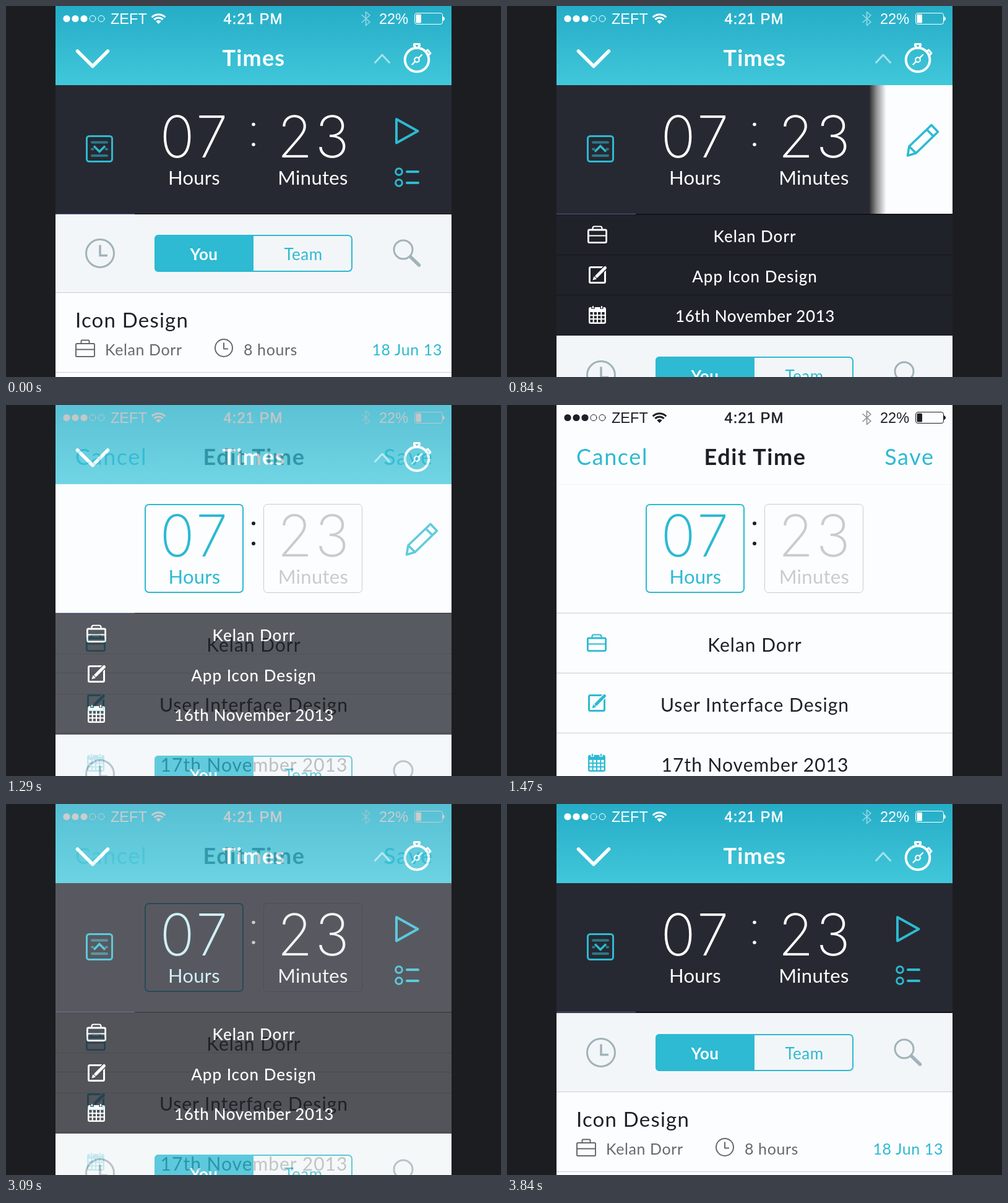
Recreate the animation shown at these times as an HTML page. Size 800x600 px, loop 4.5 s.

```html
<!DOCTYPE html>
<html lang="en">
<head>
<meta charset="utf-8">
<title>Time tracker</title>
<style>
  html, body { margin: 0; width: 100%; height: 100%; overflow: hidden; background: #1c1d21; }
  svg { display: block; }
  text { font-family: Lato, sans-serif; fill: currentColor; }
  .mid { text-anchor: middle; }
  .end { text-anchor: end; }
  .status text { font: 23.5px "Liberation Sans", Arial, sans-serif; }
  .status .clock { letter-spacing: 1.2px; stroke: currentColor; stroke-width: .6px; }
  .title { font-size: 36px; font-weight: 700; letter-spacing: 1.2px; }
  .action { font-size: 36px; letter-spacing: 1.6px; }
  .digits { font: 200 93px Inter, sans-serif; letter-spacing: 4px; }
  .unit { font-size: 31px; letter-spacing: .3px; }
  .row { font-size: 26px; font-weight: 500; letter-spacing: 1px; }
  .big { font-size: 30px; letter-spacing: 1px; }
  .tab { font-size: 26px; letter-spacing: .5px; }
  .name { font-size: 33px; letter-spacing: 1.2px; }
  .meta { font-size: 25px; letter-spacing: .6px; }
  .line { fill: none; stroke: currentColor; stroke-linecap: round; stroke-linejoin: round; }
  .gap { fill: none; stroke: var(--bg); }

  .list, .icon, .flip, .wipe, .edit, .cancel { animation: 4500ms linear infinite both; }
  .list { animation-name: list; }
  .icon { animation-name: press; transform-origin: 151px 231px; }
  .flip { animation-name: flip; animation-timing-function: step-end; transform-origin: 151px 231px; }
  .wipe { animation-name: wipe; }
  .edit { animation-name: edit; }
  .cancel { animation-name: cancel; animation-timing-function: step-end; }

  @keyframes list {
    0%, 3% { transform: translateY(0); animation-timing-function: ease-in-out; }
    9.3% { transform: translateY(197px); }
    78.667% { transform: translateY(197px); animation-timing-function: ease-in-out; }
    85.3%, 100% { transform: translateY(2px); }
  }
  @keyframes press {
    0%, 2.667% { transform: scale(1); }
    4.667% { transform: scale(.88); }
    8%, 78% { transform: scale(1); }
    78.667% { transform: scale(.955); }
    80.667% { transform: scale(.88); }
    84%, 100% { transform: scale(1); }
  }
  @keyframes flip {
    0% { transform: scaleY(1); }
    5.3% { transform: scaleY(-1); }
    81.3%, 100% { transform: scaleY(1); }
  }
  @keyframes wipe {
    0%, 15.333% { transform: translateX(0); animation-timing-function: cubic-bezier(.4, .2, .8, .75); }
    24% { transform: translateX(-473px); }
    26.667%, 45% { transform: translateX(-670px); }
    45.01%, 100% { transform: translateX(0); }
  }
  @keyframes edit {
    0%, 27.333% { opacity: 0; }
    32.6%, 64.6% { opacity: 1; }
    69.9%, 100% { opacity: 0; }
  }
  @keyframes cancel {
    0% { opacity: 1; }
    62.6% { opacity: .5; }
    72%, 100% { opacity: 1; }
  }
</style>
</head>
<body>
<svg width="800" height="600">
  <defs>
    <linearGradient id="sky" x2="0" y2="1">
      <stop stop-color="#25adc7"/><stop offset="1" stop-color="#41c7da"/>
    </linearGradient>
    <linearGradient id="shade">
      <stop stop-color="#0b0b0e" stop-opacity=".92"/>
      <stop offset=".45" stop-color="#0b0b0e" stop-opacity=".45"/>
      <stop offset="1" stop-color="#0b0b0e" stop-opacity="0"/>
    </linearGradient>
    <clipPath id="front"><rect class="wipe" x="80" y="128" width="640" height="208"/></clipPath>

    <g id="status" class="status">
      <g fill="currentColor">
        <circle cx="98" cy="20.5" r="5.6"/><circle cx="112" cy="20.5" r="5.6"/><circle cx="126" cy="20.5" r="5.6"/>
        <path d="M246.5 29l-4.2-4.2a6 6 0 0 1 8.4 0z"/>
        <rect x="662.5" y="13.5" width="8.5" height="14" rx="1.5"/>
        <path d="M706 17q3 1 3 3.5t-3 3.5z"/>
      </g>
      <g class="line">
        <circle cx="140" cy="20.5" r="5"/><circle cx="154" cy="20.5" r="5"/>
        <rect x="660.5" y="11.5" width="45" height="18" rx="3.5"/>
        <path stroke-width="3" stroke-linecap="butt" d="M239.4 21.9a10 10 0 0 1 14.2 0M235.7 18.2a15.2 15.2 0 0 1 21.6 0"/>
        <path stroke-width="1.6" opacity=".5" d="M575 14.5L588 26L581.5 31.5V9.5L588 15L575 26.5"/>
      </g>
      <text x="169" y="29.3">ZEFT</text>
      <text class="mid clock" x="399.5" y="29.3">4:21 PM</text>
      <text x="603" y="29.3">22%</text>
    </g>

    <g id="case" class="line">
      <rect x="131.4" y="362" width="29.2" height="20.6" rx="2" stroke-width="2.8"/>
      <path stroke-width="2.2" d="M132 371.5h28M138.5 361v-1.5q0-3 3-3h9q3 0 3 3v1.5"/>
    </g>
    <g id="note">
      <rect class="line" x="133.5" y="422.5" width="25" height="25" rx="2" stroke-width="3"/>
      <path class="gap" stroke-width="8" d="M146 436L161 421"/>
      <path class="line" stroke-width="5" stroke-linecap="butt" d="M145 437L158.5 423.5"/>
      <path fill="currentColor" d="M138.500 443.500l2-6.500 4.500 4.500z"/>
    </g>
    <g id="cal">
      <rect class="line" x="133.2" y="488.2" width="25.6" height="24.6" rx="2" stroke-width="2.4"/>
      <path fill="currentColor" d="M133 488h26v7h-26z"/>
      <path class="line" stroke-width="2" d="M139.700 494v18M146 494v18M152.300 494v18M134 500.300h24M134 506.300h24"/>
      <path class="gap" stroke-width="5" d="M139 484v6M153 484v6"/>
      <path class="line" stroke-width="2.2" d="M139 486v2.500M153 486v2.500"/>
    </g>

    <g id="boxes">
      <rect x="80" y="128" width="640" height="208" fill="#fcfdff"/>
      <g color="#2dbad2">
        <rect class="line" x="225" y="161" width="158" height="142" rx="6" stroke-width="2"/>
        <text class="mid digits" x="305.5" y="245">07</text>
        <text class="mid unit" x="304.5" y="288.5">Hours</text>
      </g>
      <g color="#cbcbcc">
        <rect class="line" x="416.5" y="160.5" width="159" height="143" rx="6"/>
        <text class="mid digits" x="498.5" y="245">23</text>
        <text class="mid unit" x="496.5" y="288.5">Minutes</text>
      </g>
      <circle cx="400" cy="191.5" r="3" fill="#1f2026"/><circle cx="400" cy="224" r="3" fill="#1f2026"/>
    </g>
  </defs>

  <!-- detail drawer -->
  <rect x="80" y="336" width="640" height="264" fill="#20222a"/>
  <path stroke="#15161a" d="M80 402.5h640M80 467.5h640M80 532.5h640"/>
  <path fill="#121317" d="M80 336h640v2h-640z"/>
  <g color="#fff" style="--bg:#20222a">
    <use href="#case"/><use href="#note"/><use href="#cal"/>
    <text class="mid row" x="400.5" y="381.5">Kelan Dorr</text>
    <text class="mid row" x="400.5" y="446.5">App Icon Design</text>
    <text class="mid row" style="letter-spacing:.6px" x="401" y="511">16th November 2013</text>
  </g>

  <!-- entries -->
  <g class="list">
    <rect x="80" y="336" width="640" height="128" fill="#f3f6f8"/>
    <rect x="80" y="464" width="640" height="400" fill="#fcfdff"/>
    <path stroke="#cbcccd" d="M80 463.5h640M80 592.5h640"/>
    <g class="line" color="#a1b3ba" stroke-width="3">
      <circle cx="152" cy="400" r="22.5"/>
      <path stroke-width="3.5" stroke-linecap="butt" stroke-linejoin="miter" d="M152 386.5v17h12"/>
      <circle cx="642" cy="394" r="15"/>
      <path stroke-width="5.5" d="M654 406L667.5 419"/>
    </g>
    <g color="#2dbad2">
      <rect class="line" x="241" y="371" width="318" height="58" rx="6" stroke-width="2"/>
      <path fill="currentColor" d="M246 370h154v60h-154a6 6 0 0 1-6-6v-48a6 6 0 0 1 6-6z"/>
      <text class="mid tab" x="480.5" y="411">Team</text>
      <text class="mid tab" x="320" y="411" color="#fff" font-weight="700">You</text>
      <text class="end meta" x="705" y="565">18 Jun 13</text>
    </g>
    <text class="name" x="112" y="520" color="#1f2026">Icon Design</text>
    <g color="#68696d">
      <g class="line" stroke-width="2">
        <rect x="113" y="546" width="30" height="21" rx="1.5"/>
        <path d="M113 555.5h30M121.5 546v-4q0-1.5 1.5-1.5h10q1.5 0 1.5 1.5v4"/>
        <circle cx="352" cy="553" r="14"/><path stroke-linecap="butt" d="M352 544.5v10h7"/>
      </g>
      <text class="meta" x="160" y="565">Kelan Dorr</text>
      <text class="meta" x="384" y="565">8 hours</text>
    </g>
  </g>
  <path stroke="#121317" d="M80 336.5h640"/>

  <!-- timer panel, wiped away to show the editable boxes -->
  <use href="#boxes"/>
  <path class="line" color="#2dbad2" stroke-width="3.6" d="M647.5 242L650 227L686 192.5L696.5 203.5L661 238zM650 227L661 238M678.5 200L689 210.5"/>
  <rect class="wipe" x="720" y="128" width="29" height="208" fill="url(#shade)"/>
  <g clip-path="url(#front)">
    <rect x="80" y="128" width="640" height="208" fill="#272932"/>
    <g color="#fff">
      <text class="mid digits" x="305.5" y="245">07</text>
      <text class="mid digits" x="498.5" y="245">23</text>
      <text class="mid unit" x="304" y="288.5">Hours</text>
      <text class="mid unit" x="496" y="288.5">Minutes</text>
      <circle cx="400" cy="191.5" r="2.8" fill="#fff"/><circle cx="400" cy="224" r="2.8" fill="#fff"/>
    </g>
    <g class="line" color="#2dbad2" stroke-width="4">
      <path d="M631 183L665.5 202.2L631 221.4z"/>
      <path d="M648 268h18M648 286h18"/>
      <g stroke-width="3"><circle cx="635" cy="268" r="5.3"/><circle cx="635" cy="286" r="5.3"/></g>
      <g class="icon">
        <rect x="130.5" y="210.5" width="41" height="41" rx="4" stroke-width="3"/>
        <path opacity=".55" d="M139 220.5h24M139 231.5h1.5M161.5 231.5h1.5M139 242h24"/>
        <path class="flip" stroke-width="3.5" stroke-linecap="butt" stroke-linejoin="miter" d="M142 226.5L151 235.5L160 226.5"/>
      </g>
    </g>
  </g>
  <path stroke="#56629c" d="M80 336.5h128"/>

  <!-- header -->
  <rect x="80" width="640" height="128" fill="url(#sky)"/>
  <g color="#fff">
    <use href="#status"/>
    <text class="mid title" x="400.5" y="97">Times</text>
    <g class="line">
      <path stroke-width="5.5" d="M115.5 73L140 97.5L164.5 73"/>
      <path stroke-width="3" opacity=".55" d="M596.5 91.5L608 79L619.5 91.5"/>
      <circle cx="664" cy="87" r="19.3" stroke-width="4"/>
      <path stroke-width="3" d="M661 67v-2.5h-1.5v-3h9v3h-1.5v2.5M678.5 73.5l3-2.5 4.5 5.5-3 3"/>
      <circle cx="664" cy="87" r="3.8" stroke-width="2.2"/>
      <path stroke-width="2.4" d="M667 84l5-5M661 90l-4.5 4.5"/>
    </g>
  </g>

  <!-- edit screen -->
  <g class="edit">
    <rect x="80" width="640" height="600" fill="#fcfdff"/>
    <use href="#boxes"/>
    <path stroke="#f1f3f5" d="M80 128.5h640"/>
    <path stroke="#cbcccd" d="M80 336.5h640M80 433.5h640M80 530.5h640"/>
    <g color="#1f2026">
      <use href="#status"/>
      <text class="mid title" style="letter-spacing:1.6px" x="401" y="97">Edit Time</text>
      <text class="mid big" x="400.5" y="399">Kelan Dorr</text>
      <text class="mid big" x="400.5" y="496">User Interface Design</text>
      <text class="mid big" x="401" y="593">17th November 2013</text>
    </g>
    <g color="#2dbad2" style="--bg:#fcfdff">
      <text class="action cancel" x="112" y="97">Cancel</text>
      <text class="end action" x="690.5" y="97">Save</text>
      <use href="#case" x="-1" y="15"/><use href="#note" x="-1" y="47"/><use href="#cal" x="-1" y="79"/>
    </g>
  </g>

  <path fill="#1c1d21" d="M0 0h80v600h-80zM720 0h80v600h-80z"/>
</svg>
</body>
</html>
```
